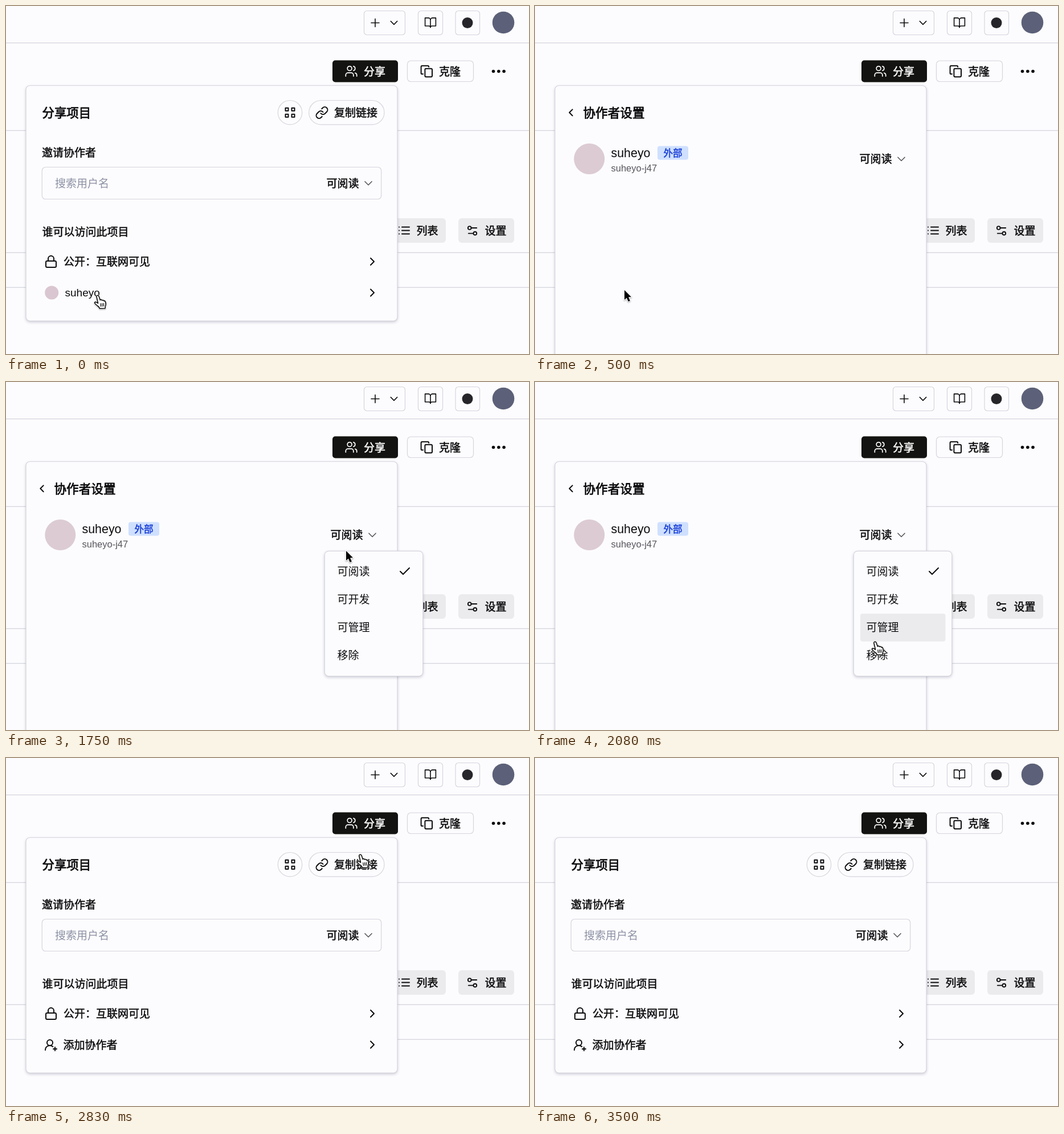
These frames come from a looping animation (918x610 px, 4010 ms). An HTML page with a canvas:

```html
<!DOCTYPE html>
<html lang="zh-CN">
<head>
<meta charset="utf-8">
<title>分享项目</title>
<style>
html, body { margin: 0; width: 100%; height: 100%; overflow: hidden; background: #fcfcfe; }
canvas { display: block; }
</style>
</head>
<body>
<canvas id="stage" width="918" height="610"></canvas>
<script>
const ctx = document.getElementById('stage').getContext('2d');
const LOOP = 4010;
const BG = '#fcfcfe', LINE = '#d5d5de', INK = '#0c0c0e', GREY = '#ebebed';
const CJK = '"Noto Sans CJK SC", "Noto Sans CJK", sans-serif';
const LATIN = '"Liberation Sans", Arial, sans-serif';
const USER = 'suheyo', USER_ID = 'suheyo-j47';

// Icons on a 24 unit grid
const ICONS = {
  plus: 'M5 12h14M12 5v14',
  down: 'M6 9l6 6 6-6',
  right: 'M9 18l6-6-6-6',
  left: 'M15 18l-6-6 6-6',
  check: 'M20 6L9 17l-5-5',
  book: 'M2 3h6a4 4 0 0 1 4 4v14a3 3 0 0 0-3-3H2zM22 3h-6a4 4 0 0 0-4 4v14a3 3 0 0 1 3-3h7z',
  users: 'M16 21v-2a4 4 0 0 0-4-4H6a4 4 0 0 0-4 4v2M13 7a4 4 0 1 1-8 0a4 4 0 1 1 8 0M22 21v-2a4 4 0 0 0-3-3.87M16 3.13a4 4 0 0 1 0 7.75',
  addUser: 'M2 21a8 8 0 0 1 13.29-6M15 8a5 5 0 1 1-10 0a5 5 0 1 1 10 0M19 16v6M22 19h-6',
  copy: 'M11 7h9a2 2 0 0 1 2 2v11a2 2 0 0 1-2 2H11a2 2 0 0 1-2-2V9a2 2 0 0 1 2-2zM5.5 17H4a2 2 0 0 1-2-2V4a2 2 0 0 1 2-2h10a2 2 0 0 1 2 2',
  link: 'M10 13a5 5 0 0 0 7.54.54l3-3a5 5 0 0 0-7.07-7.07l-1.72 1.71M14 11a5 5 0 0 0-7.54-.54l-3 3a5 5 0 0 0 7.07 7.07l1.71-1.71',
  lock: 'M5 11h14a2 2 0 0 1 2 2v7a2 2 0 0 1-2 2H5a2 2 0 0 1-2-2v-7a2 2 0 0 1 2-2zM7 11V7a5 5 0 0 1 10 0v4',
  list: 'M8 6h13M8 12h13M8 18h13M3 6h.01M3 12h.01M3 18h.01',
  sliders: 'M20 7h-9M14 17H5M20 17a3 3 0 1 1-6 0a3 3 0 1 1 6 0M10 7a3 3 0 1 1-6 0a3 3 0 1 1 6 0',
  grid: 'M4 4h5v5H4zM15 4h5v5h-5zM4 15h5v5H4zM15 15h5v5h-5z'
};
for (const name in ICONS) ICONS[name] = new Path2D(ICONS[name]);

const HAND = new Path2D('M-2 2Q-2.5-.5-.3-.8Q1.6-1 2.3 1.5L4.3 7.5Q5.5 5.8 7 7.2L7.6 8Q9 6.8 10.4 8.2L10.9 9Q12.8 8.4 13.6 10.5Q15 15 13.4 18L13 22L3.5 22.3Q2.8 19.5-.5 17.5Q-4.5 14.5-5.6 12.2Q-5 10.2-2.6 11.2L.6 13.2Z');
const KNUCKLES = new Path2D('M4.8 13.5l.7 5M7.6 13.3l.5 5M10.4 13l.2 5');
const ARROW = new Path2D('M0 0V17L3.9 13.4L6.7 20L9.9 18.7L7.1 12.3L12 12Z');

// Pointer: time, x, y, shape, hovered row
const POSES = [
  [0, 161, 508, 'hand'], [80, 159, 503, 'hand', 1], [170, 157, 498, 'hand', 1],
  [500, 157, 498, 'arrow'], [1000, 163, 494, 'arrow'], [1080, 205, 455, 'arrow'],
  [1170, 318, 378, 'arrow'], [1250, 452, 308, 'arrow'], [1330, 550, 264, 'arrow'],
  [1420, 588, 260, 'hand'], [1500, 597, 260, 'hand'], [1580, 597, 261, 'hand'],
  [1670, 597, 270, 'hand'], [1750, 597, 296, 'arrow'], [1830, 597, 340, 'hand'],
  [1920, 597, 388, 'hand', 0], [2000, 597, 432, 'hand', 1], [2080, 597, 456, 'hand', 2],
  [2170, 598, 459, 'hand', 3], [2250, 598, 462, 'hand', 3], [2330, 598, 463, 'hand', 3],
  [2580, 598, 463, 'hand'], [2670, 598, 448, 'hand', 0], [2750, 606, 330, 'hand'],
  [2830, 622, 170, 'hand'], [2920, 628, 100, 'hand'], [3000, 590, 235, 'arrow'],
  [3080, 545, 428, 'hand'], [3170, 515, 468, 'hand', 0], [3250, 499, 511, 'hand', 0],
  [3330, 499, 511, 'hand', 1], [3500, 0, 0, 'none']
];

function box(x, y, w, h, r, fill, stroke) {
  ctx.beginPath();
  ctx.roundRect(x, y, w, h, r);
  if (fill) { ctx.fillStyle = fill; ctx.fill(); }
  if (stroke) { ctx.strokeStyle = stroke; ctx.lineWidth = 1.2; ctx.stroke(); }
}

function card(x, y, w, h) {
  ctx.save();
  ctx.shadowColor = 'rgba(40,40,80,.25)';
  ctx.shadowBlur = 5;
  ctx.shadowOffsetY = 2;
  box(x, y, w, h, 7, BG);
  ctx.restore();
  box(x, y, w, h, 7, null, LINE);
}

function disc(x, y, r, fill) {
  ctx.beginPath();
  ctx.arc(x, y, r, 0, Math.PI * 2);
  ctx.fillStyle = fill;
  ctx.fill();
}

// Text is placed by its left edge and the centre of its line;
// a thin outline of width `bold` gives the weights between regular and bold
function label(str, x, cy, { size = 19, bold = 0.5, color = INK, font = CJK } = {}) {
  const y = cy + size * 0.38;
  ctx.font = `400 ${size}px ${font}`;
  ctx.fillStyle = ctx.strokeStyle = color;
  ctx.fillText(str, x, y);
  if (bold) {
    ctx.lineWidth = bold;
    ctx.lineJoin = 'round';
    ctx.strokeText(str, x, y);
  }
}

function icon(name, cx, cy, { width = 2, color = INK, scale = 1 } = {}) {
  ctx.save();
  ctx.translate(cx, cy);
  ctx.scale(scale, scale);
  ctx.translate(-12, -12);
  ctx.lineWidth = width / scale;
  ctx.lineCap = ctx.lineJoin = 'round';
  ctx.strokeStyle = color;
  ctx.stroke(ICONS[name]);
  ctx.restore();
}

function drawPage() {
  ctx.fillStyle = BG;
  ctx.fillRect(0, 0, 918, 610);
  ctx.fillStyle = LINE;
  for (const y of [64, 217.7, 431.7, 492.7]) ctx.fillRect(0, y, 918, 1.3);

  box(628.5, 8.5, 72, 42, 5, null, LINE);
  icon('plus', 648, 29.5, { width: 1.6 });
  icon('down', 681, 29.5, { width: 1.5, scale: 0.95 });
  box(723.5, 8.5, 43, 42, 5, null, LINE);
  icon('book', 745, 29.3, { width: 1.6, scale: 0.94 });
  box(789, 8.5, 42.5, 42, 5, null, LINE);
  disc(810, 29.5, 9.5, '#26262a');
  disc(873, 29, 19.3, '#5c6078');

  box(573, 95.2, 115, 38.2, 5, '#131311');
  icon('users', 606, 114.3, { color: '#fff', width: 1.7, scale: 0.97 });
  label('分享', 628, 114.3, { color: '#fff' });
  box(704.5, 96, 116, 36.5, 6, null, LINE);
  icon('copy', 738.3, 114.5, { scale: 0.97 });
  label('克隆', 760, 114.3);
  for (const x of [855.5, 864.8, 874]) disc(x, 114.5, 2.8, INK);

  box(660, 372, 112, 43, 6, GREY);
  icon('list', 699, 393.5);
  label('列表', 720.5, 393.5);
  box(794, 372, 98, 43, 6, GREY);
  icon('sliders', 818.5, 393.8, { width: 1.9, scale: 0.96 });
  label('设置', 840.5, 393.5);
}

function drawShare(hover, hasMember) {
  card(35, 139.5, 652, 412.5);
  label('分享项目', 63.5, 186.8, { size: 21.4, bold: 0.8 });
  box(477.3, 165.5, 42.4, 42.4, 21.2, null, LINE);
  icon('grid', 498.5, 186.7);
  box(531.7, 165.5, 132.3, 42.4, 21.2, null, LINE);
  icon('link', 554.5, 187);
  label('复制链接', 576, 186.5);

  label('邀请协作者', 63, 257);
  box(63.3, 282.5, 595.4, 56, 6, null, LINE);
  label('搜索用户名', 86, 310.3, { bold: 0, color: '#8c90a3' });
  label('可阅读', 562.5, 310.3);
  icon('down', 636, 310.7, { width: 1.6, color: '#55555c' });

  label('谁可以访问此项目', 63.5, 396);
  if (hover !== undefined) box(57, 421 + hover * 54.3, 607.5, 54, 7, GREY);
  icon('lock', 79, 448);
  label('公开：互联网可见', 101, 448);
  if (hasMember) {
    disc(80.2, 502.5, 12, '#dac6d0');
    label(USER, 103.5, 501.8, { bold: 0, font: LATIN });
  } else {
    icon('addUser', 79, 503);
    label('添加协作者', 100.5, 502.5);
  }
  icon('right', 643, 448);
  icon('right', 643, 502.5);
}

function drawMember() {
  card(35, 139.5, 652, 520);
  icon('left', 63, 186.8, { scale: 0.9 });
  label('协作者设置', 84.5, 187, { size: 21.6, bold: 0.8 });
  disc(95.3, 268, 27, '#dccbd3');
  label(USER, 133.5, 257, { size: 21.4, bold: 0, font: LATIN });
  box(215, 245.5, 54, 24, 4, '#cfe0ff');
  label('外部', 225.5, 257.5, { size: 16.6, color: '#1c40d6' });
  label(USER_ID, 133.5, 284.2, { size: 16.5, bold: 0, color: '#55555c', font: LATIN });
  label('可阅读', 569.5, 268);
  icon('down', 643, 268.2, { width: 1.6, color: '#55555c' });
}

function drawMenu(hover) {
  card(559.3, 296.3, 172.5, 219.2);
  if (hover !== undefined) box(571, 308 + hover * 49, 149.5, 48.8, 4, GREY);
  ['可阅读', '可开发', '可管理', '移除'].forEach((name, i) => {
    label(name, 581.5, 332 + i * 49, { bold: 0 });
  });
  icon('check', 700, 332);
}

function drawPointer(x, y, shape) {
  if (shape === 'none') return;
  const hand = shape === 'hand';
  const path = hand ? HAND : ARROW;
  ctx.save();
  ctx.translate(x, y);
  ctx.lineJoin = ctx.lineCap = 'round';
  ctx.strokeStyle = '#fff';
  ctx.lineWidth = hand ? 2.6 : 2.4;
  ctx.shadowColor = 'rgba(0,0,0,.35)';
  ctx.shadowBlur = 2;
  ctx.shadowOffsetY = 1;
  ctx.stroke(path);
  ctx.shadowColor = 'transparent';
  ctx.fillStyle = hand ? '#fff' : '#000';
  ctx.fill(path);
  if (hand) {
    ctx.strokeStyle = '#000';
    ctx.lineWidth = 1.5;
    ctx.stroke(path);
    ctx.lineWidth = 1.2;
    ctx.stroke(KNUCKLES);
  }
  ctx.restore();
}

function draw(t) {
  const [, x, y, shape, hover] = POSES.findLast(pose => pose[0] <= t);
  drawPage();
  if (t >= 500 && t < 2580) {
    drawMember();
    if (t >= 1580) drawMenu(hover);
  } else {
    drawShare(hover, t < 500);
  }
  drawPointer(x, y, shape);
}

const start = performance.now();
function tick() {
  draw((performance.now() - start) % LOOP);
  requestAnimationFrame(tick);
}
tick();
</script>
</body>
</html>
```
